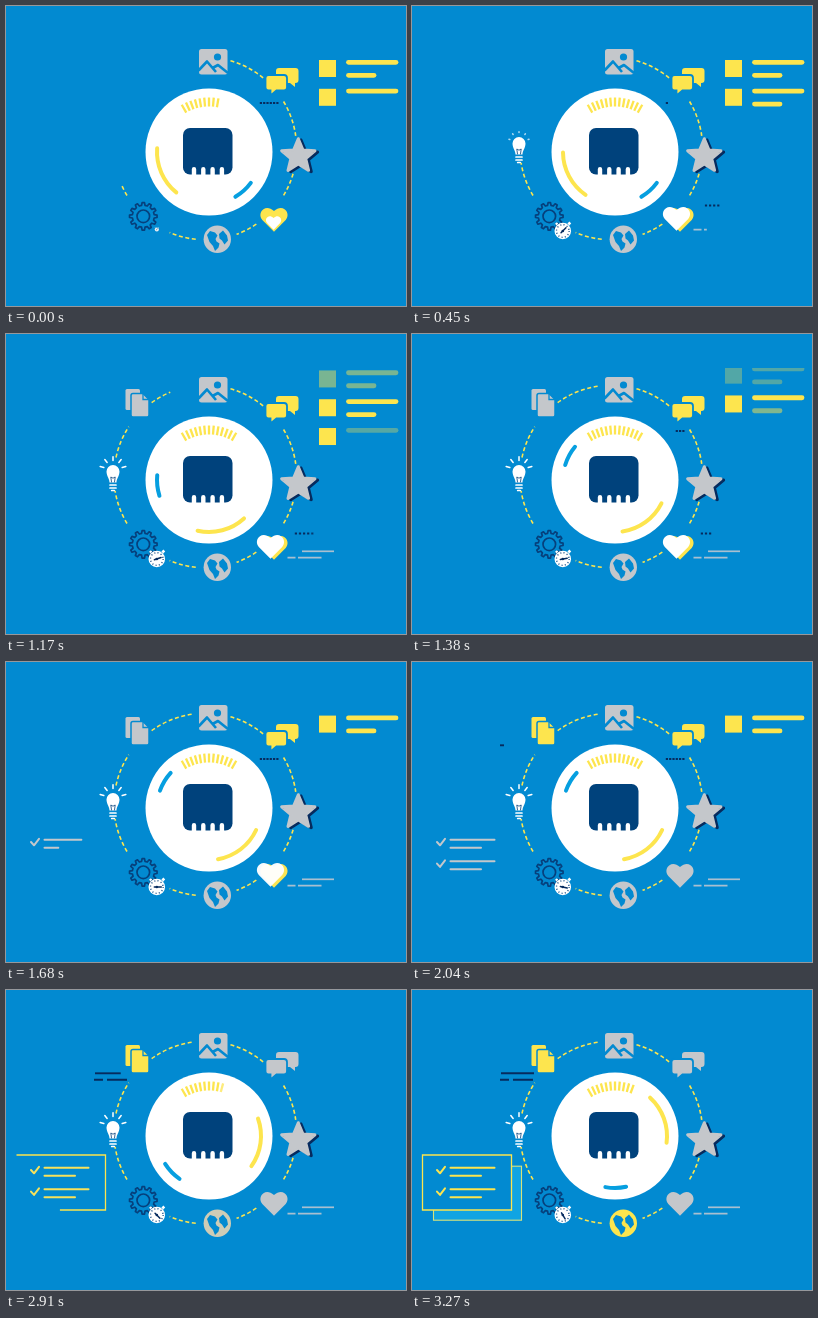
Write an HTML page that moves like this. It is 400 px wide and 300 px high and loops after 3300 ms.

```html
<!DOCTYPE html>
<html lang="en">
<head>
<meta charset="utf-8">
<title>Chip and icon ring</title>
<style>
  html, body { margin: 0; width: 100%; height: 100%; overflow: hidden; background: #028ad1; }
  svg { display: block; width: 100vw; height: 100vh; }
  .line { fill: none; stroke-linecap: round; stroke-linejoin: round; }
</style>
</head>
<body>
<svg id="stage" viewBox="0 0 400 300" xmlns="http://www.w3.org/2000/svg">
  <defs>
    <clipPath id="listClip"><rect x="305" y="34" width="95" height="110"/></clipPath>
    <path id="heartShape" d="M0 12.5L-11.7 .6C-17.5 -6 -9 -16.5 0 -8.3C9 -16.5 17.5 -6 11.7 .6Z"/>
  </defs>
  <rect width="400" height="300" fill="#028ad1"/>
  <g id="ring" class="line" stroke="#fde54e" stroke-width="1.6" style="stroke-linecap:butt" stroke-dasharray="4 2.6"></g>

  <circle cx="203" cy="146" r="63.5" fill="#fff"/>
  <g id="ticks" stroke="#fde54e" stroke-width="2.3"></g>
  <path id="arcYellow" class="line" stroke="#fde54e" stroke-width="4"/>
  <path id="arcBlue" class="line" stroke="#069fe0" stroke-width="4"/>
  <rect x="177" y="122" width="49.5" height="46.5" rx="7" fill="#00427c"/>
  <path class="line" stroke="#fff" stroke-width="4.4" d="M188 163.3v6M197.3 163.3v6M206.6 163.3v6M215.9 163.3v6"/>

  <g id="image">
    <rect x="193" y="43" width="28.5" height="25.5" rx="2.5" fill="#c4c7cb"/>
    <circle cx="211.5" cy="51" r="3.6" fill="#028ad1"/>
    <path class="line" stroke="#028ad1" stroke-width="2.6" style="stroke-linecap:butt" d="M192.500 64.500L201 55.500L210 66M206.500 62L212 59L222 67"/>
  </g>

  <g id="chat">
    <path d="M273 62h16.500q3 0 3 3v9q0 3 -3 3h-.5v4l-5 -4h-11q-3 0 -3 -3v-9q0 -3 3 -3z"/>
    <path stroke="#028ad1" stroke-width="1.8" d="M262.500 69h15.500q3 0 3 3v9.500q0 3 -3 3h-7.500l-6 5v-5h-2q-3 0 -3 -3v-9.500q0 -3 3 -3z"/>
  </g>
  <g id="chatDots" stroke="#062b5e" stroke-width="2"></g>

  <g id="star" stroke-width="3" stroke-linejoin="round"></g>

  <use id="heartBack" href="#heartShape"/>
  <use id="heartFront" href="#heartShape" fill="#fff"/>
  <g id="heartDots" stroke="#062b5e" stroke-width="2"></g>
  <g stroke="#a9bfd0" stroke-width="1.7">
    <path id="heartTop"/><path id="heartLow"/>
  </g>

  <g id="globe">
    <circle cx="211.300" cy="233.300" r="13.700"/>
    <path fill="#028ad1" d="M201 229l3 -4l5 1.500l2.500 3l-2 3.500l1 2.500l3 2l-1 4l-3.500 3.500l-2 -5l-3.500 -4zM213 228l4 -3.500l4 5l1 5l-3.500 4l-2.500 -4l-2.500 -2z"/>
  </g>

  <g id="gear" class="line" stroke="#06407c" stroke-width="1.700" transform="translate(137.300 210.300)"><circle r="6.300"/></g>

  <g id="watch">
    <circle r="8.300" fill="#fff"/>
    <path stroke="#fff" stroke-width="2.600" d="M5.500 -6.500L7.500 -8.500M-5.500 -6.500L-6.800 -8"/>
    <circle r="6.300" fill="none" stroke="#06407c" stroke-width="1.300" stroke-dasharray="1 2.299"/>
    <path id="hand" class="line" stroke="#062b5e" stroke-width="1.500" d="M-2.500 0H4.500"/>
    <circle r="1.300" fill="#062b5e"/>
  </g>

  <g id="bulb">
    <path fill="#fff" d="M-6.500 -5.500A6.500 6.500 0 0 1 6.500 -5.500C6.500 -1 3.500 1.500 3.500 5.500H-3.500C-3.500 1.500 -6.500 -1 -6.500 -5.500Z"/>
    <path class="line" stroke="#fff" stroke-width="1.700" d="M-3 8H3M-3 11H3M-1.300 13.500H1.300"/>
    <path class="line" stroke="#06407c" stroke-width=".8" d="M-1.500 5L-2.200 0L0 1.200L2.200 0L1.500 5"/>
  </g>
  <g id="rays" class="line" stroke="#fff" stroke-width="1.500"></g>

  <g id="doc">
    <path d="M-9 -14H2.500Q4 -14 4 -12.500V7H-9Q-10.500 7 -10.500 5.500V-12.500Q-10.500 -14 -9 -14Z"/>
    <path stroke="#028ad1" stroke-width="1.500" d="M-3 -9.500H7L13 -3.500V12Q13 14 11 14H-3Q-5 14 -5 12V-7.500Q-5 -9.500 -3 -9.500Z"/>
    <path fill="none" stroke="#028ad1" stroke-width="1.300" d="M7 -9.500V-3.500H13"/>
  </g>
  <g stroke="#062b5e" stroke-width="1.900">
    <path id="docTop"/><path id="docLow"/>
  </g>

  <g clip-path="url(#listClip)"><g id="list" fill="#fde54e" stroke="#fde54e"></g></g>

  <rect id="boxBack" width="88" height="54" fill="#10a4e3" stroke="#d7e37c" stroke-width="1.100"/>
  <rect id="boxFront" x="10.500" y="165" width="89" height="55" fill="#028ad1" stroke="#fde54e" stroke-width="1.300" pathLength="1"/>
  <g id="checks" class="line" stroke-width="2"></g>
</svg>
<script>
const LOOP = 3300, YELLOW = '#fde54e', GRAY = '#c4c7cb';
const $ = id => document.getElementById(id);
const clamp = v => Math.max(0, Math.min(1, v));
const prog = (t, a, b) => clamp((t - a) / (b - a));
const smooth = u => u * u * (3 - 2 * u);
const ease = (t, a, b) => smooth(prog(t, a, b));
const out = (t, a, b) => 1 - (1 - prog(t, a, b)) ** 3;
const lerp = (a, b, u) => a + (b - a) * u;

function make(parent, tag, attrs) {
  const el = document.createElementNS('http://www.w3.org/2000/svg', tag);
  set(el, attrs);
  return parent.appendChild(el);
}
function set(el, attrs) {
  for (const k in attrs) el.setAttribute(k, attrs[k]);
}
function keyed(t, keys) {
  for (let i = 1; i < keys.length; i++) {
    const [a, u] = keys[i - 1], [b, v] = keys[i];
    if (t <= b) return lerp(u, v, prog(t, a, b));
  }
  return keys[keys.length - 1][1];
}
function mix(a, b, u) {
  const part = (c, i) => parseInt(c.slice(i, i + 2), 16);
  return `rgb(${[1, 3, 5].map(i => Math.round(lerp(part(a, i), part(b, i), u)))})`;
}

// Angles in degrees, clockwise from the right.
function polar(cx, cy, r, deg) {
  const a = deg * Math.PI / 180;
  return [cx + r * Math.cos(a), cy + r * Math.sin(a)].map(v => v.toFixed(2)).join(' ');
}
function arc(cx, cy, r, from, to) {
  return `M${polar(cx, cy, r, from)}A${r} ${r} 0 ${to - from > 180 ? 1 : 0} 1 ${polar(cx, cy, r, to)}`;
}

// Ring stretches between icons, clockwise from the top.
const stretches = [[16, 40], [59, 82], [106, 122], [146, 160], [186, 203], [239, 261], [282, 303], [324, 352]];
const ringParts = stretches.map(() => make($('ring'), 'path', {}));
const ringKeys = [[0, 246], [350, 261], [600, 282], [900, 303], [1050, 324], [1300, 352]];

const ticks = Array.from({ length: 13 }, (_, i) => {
  const deg = -120 + i * 5;
  return make($('ticks'), 'path', { d: `M${polar(203, 146, 45.5, deg)}L${polar(203, 146, 54.5, deg)}` });
});

function dotRow(id, x, y, n, step) {
  return Array.from({ length: n }, (_, i) =>
    make($(id), 'path', { d: `M${x + i * step} ${y}h2.2` }));
}
const chatDots = dotRow('chatDots', 253.8, 97, 6, 3.3);
const heartDots = dotRow('heartDots', 288.800, 199.500, 5, 4.1);
function showDots(dots, from, to) {
  dots.forEach((d, i) => set(d, { opacity: Math.min(clamp(i + 1 - from), clamp(to - i)) }));
}

const starPoints = Array.from({ length: 10 }, (_, i) =>
  polar(0, 0, i % 2 ? 7.8 : 17.5, i * 36 - 90)).join(' ');
for (const [x, y, fill] of [[295, 151.500, '#062b5e'], [292.300, 150.200, GRAY]])
  make($('star'), 'polygon', { points: starPoints, fill, stroke: fill, transform: `translate(${x} ${y})` });

// Gear outline with twelve teeth.
let gearPath = '';
for (let i = 0; i < 12; i++) {
  const a = i * 30;
  [[11, -9], [13.8, -5], [13.8, 5], [11, 9]].forEach(([r, d], j) => {
    gearPath += (i + j ? 'L' : 'M') + polar(0, 0, r, a + d);
  });
}
make($('gear'), 'path', { d: gearPath + 'Z' });

const rays = [-165, -128, -90, -52, -15].map(deg => ({ deg, el: make($('rays'), 'path', {}) }));

const rows = [[-900, -700, 30], [-400, -200, 60], [780, 1130, 1320]].map((times, i) => {
  const g = make($('list'), 'g', {});
  const line = (y, w) => make(g, 'path', {
    d: `M342.500 ${y}h${w}`, 'stroke-width': 4.8, 'stroke-linecap': 'round' });
  const square = make(g, 'rect', { x: 313, y: 0, width: 17, height: 17, stroke: 'none' });
  if (i === 0) times[2] = -500;
  return { g, times, parts: [square, line(2.300, 47.500), line(15.300, 25.500)] };
});

const checkLines = [];
for (const y of [178, 199.600]) {
  for (const [d, len] of [[`M25 ${y + 2}l3 3.300l5 -6.500`, 13], [`M38.500 ${y - .3}h44`, 44], [`M38.500 ${y + 7.700}h30.500`, 30.500]])
    checkLines.push({ len, el: make($('checks'), 'path', { d, 'stroke-dasharray': `${len} 60` }) });
}

// Horizontal strokes revealed from the left up to the given edge.
function strokes(id, y, edge, spans) {
  const d = spans.filter(s => edge > s[0]).map(([a, b]) => `M${a} ${y}H${Math.min(b, edge)}`).join('');
  set($(id), { d });
}

function drawDial(t) {
  const first = ease(t, 545, 1450), second = ease(t, 2290, 3390);
  const yellow = 152 + 4.500 * (1 - out(t, 0, 450)) - 99.500 * first - 75 * second;
  const blue = 48 + 163 * first - 126 * second;
  set($('arcYellow'), { d: arc(203, 146, 52, yellow - 27.500, yellow + 27.500) });
  set($('arcBlue'), { d: arc(203, 146, 52, blue - 11.500, blue + 11.500) });
  const count = keyed(t, [[0, 9], [300, 13], [2100, 13], [2500, 9], [2700, 9], [3270, 11]]);
  ticks.forEach((el, i) => set(el, { opacity: clamp(count - i) }));
}

function drawRing(t) {
  const end = keyed(t, ringKeys);
  stretches.forEach(([a, b], i) => {
    const to = Math.min(b, end);
    set(ringParts[i], { d: to > a ? arc(199.300, 142.500, 91.300, a - 90, to - 90) : '' });
  });
}

function drawHeart(t) {
  const grow = out(t, -70, 330), gray = ease(t, 1650, 1900);
  const s = lerp(.22, 1, grow);
  set($('heartBack'), { transform: 'translate(268 213.300)', fill: mix(YELLOW, GRAY, gray) });
  set($('heartFront'), {
    transform: `translate(${lerp(270, 264.500, grow)} ${lerp(220, 212.300, grow)}) scale(${s})`,
    opacity: 1 - gray
  });
  showDots(heartDots, keyed(t, [[350, 5], [450, 1], [580, 0]]), keyed(t, [[1150, 5], [1380, 3], [1620, 0]]));
  strokes('heartTop', 217.300, lerp(296, 328, out(t, 560, 1180)), [[296, 328]]);
  strokes('heartLow', 223.700, lerp(281, 316, prog(t, 300, 680)), [[281.500, 289.500], [292, 315.500]]);
}

function drawIcons(t) {
  set($('chat'), { fill: mix(YELLOW, GRAY, ease(t, 2250, 2480)) });
  if (t < 1000) showDots(chatDots, 0, keyed(t, [[30, 6], [450, 1], [560, 0]]));
  else showDots(chatDots, keyed(t, [[1200, 6], [1380, 3], [1600, 0]]), keyed(t, [[2100, 6], [2550, 1], [2650, 0]]));

  set($('globe'), { fill: mix(GRAY, YELLOW, ease(t, 2850, 3080)) });
  set($('watch'), { transform: `translate(150.800 ${lerp(223.500, 225, out(t, 0, 330))}) scale(${lerp(.25, 1, out(t, 0, 330))})` });
  set($('hand'), { transform: `rotate(${-62 + t * .037})` });

  set($('bulb'), { transform: `translate(107 143) scale(${out(t, 180, 430)})` });
  const shine = out(t, 420, 780);
  rays.forEach(({ deg, el }) => set(el, {
    d: `M${polar(107, 136, 9.500, deg)}L${polar(107, 136, 9.500 + 3.800 * shine, deg)}`, opacity: clamp(shine * 3)
  }));

  set($('doc'), {
    transform: `translate(130 69) scale(${out(t, 590, 850)})`,
    fill: mix(GRAY, YELLOW, ease(t, 1700, 1920))
  });
  const drop = ease(t, 2600, 2900);
  strokes('docLow', lerp(83.300, 89.800, drop), keyed(t, [[2000, 88], [2040, 92], [2550, 116], [2700, 121]]), [[88, 97], [101, 121]]);
  strokes('docTop', 83.300, lerp(89, 122, out(t, 2720, 3200)), [[89, 122]]);
}

function drawList(t) {
  const scroll = 58 * ease(t, 980, 1500);
  const leave = 1 - ease(t, 2230, 2480);
  rows.forEach(({ g, times, parts }, i) => {
    const y = 54 + 28.800 * i - scroll;
    set(g, { transform: `translate(0 ${y})`, opacity: clamp((y - 25) / 24) * leave });
    parts.forEach((el, j) => set(el, { opacity: prog(t, times[j], times[j] + 120) }));
  });
}

function drawChecks(t) {
  const lit = ease(t, 2750, 2950);
  checkLines.forEach(({ len, el }, i) => {
    const u = out(t, 1520 + i * 60, 1740 + i * 60);
    set(el, { stroke: mix(GRAY, YELLOW, lit), 'stroke-dashoffset': len * (1 - u), opacity: u > 0 ? 1 : 0 });
  });
  const frame = ease(t, 2740, 3020), slide = out(t, 2950, 3220);
  set($('boxFront'), { 'stroke-dasharray': `${frame} 2`, opacity: frame > 0 ? 1 : 0 });
  set($('boxBack'), {
    x: lerp(11, 21.500, slide), y: lerp(165.500, 176.200, slide), opacity: slide > 0 ? 1 : 0
  });
}

function draw(t) {
  drawRing(t);
  drawDial(t);
  drawHeart(t);
  drawIcons(t);
  drawList(t);
  drawChecks(t);
}

let start = null;
function tick(now) {
  if (start === null) start = now;
  draw((now - start) % LOOP);
  requestAnimationFrame(tick);
}
draw(0);
requestAnimationFrame(tick);
</script>
</body>
</html>
```
